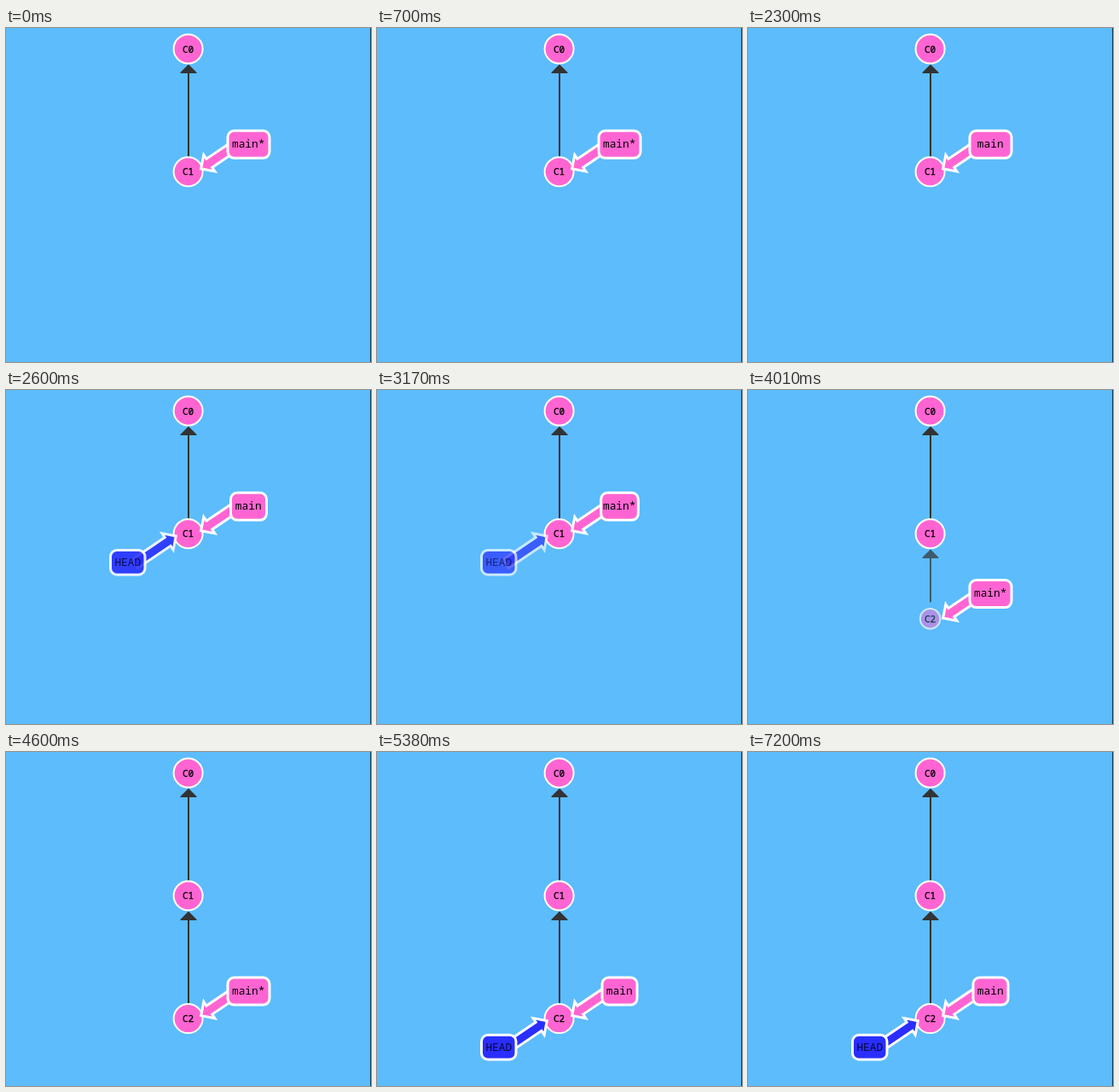
Write an HTML page that moves like this. It is 428 px wide and 391 px high and loops after 8000 ms.

```html
<!DOCTYPE html>
<html lang="en">
<head>
<meta charset="utf-8">
<title>Commit graph</title>
<style>
  /* detached: HEAD label shown; moved: labels at the new commit; born: growth of the new commit */
  @property --detached { syntax: "<number>"; inherits: true; initial-value: 0; }
  @property --moved { syntax: "<number>"; inherits: true; initial-value: 0; }
  @property --born { syntax: "<number>"; inherits: true; initial-value: 0; }

  html, body { margin: 0; width: 100%; height: 100%; overflow: hidden; background: #5cbcfc; }

  #stage {
    display: block; width: 100vw; height: 100vh;
    animation: detach 8s infinite, move 8s infinite, birth 8s infinite;
  }

  text { font: 12.83px "Noto Sans Mono", "DejaVu Sans Mono", monospace; text-anchor: middle; }
  .commit circle { fill: #ff65d2; stroke: #fff; stroke-width: 2; }
  .commit text { font-size: 11px; stroke: #000; stroke-width: .3; }
  .edge { fill: #333; }
  .ref rect, .ref use { fill: #ff65d2; stroke: #fff; stroke-width: 3; }

  #newEdge { opacity: var(--moved); }
  #newEdge .shaft { transform: translateY(calc((var(--moved) - 1) * 158px)); }

  #newCommit { transform: translateY(calc(var(--born) * 143.8px)); opacity: var(--born); }
  #newCommit circle { r: calc(var(--born) * 17px); fill-opacity: var(--born); }

  #refs { transform: translateY(calc(var(--moved) * 143.8px)); }
  #box {
    x: calc(260px + var(--detached) * 4px);
    width: calc(49px - var(--detached) * 8px);
  }
  #head > * { opacity: var(--detached); }
  #head rect, #head use { fill: #2a2eff; }
  #head text { fill: #08083c; }

  #starred { animation: starred 8s step-end infinite; }
  #plain { animation: plain 8s step-end infinite; }

  @keyframes detach {
    0%, 28.75% { --detached: 0; animation-timing-function: ease-in-out; }
    33.75%, 37.625% { --detached: 1; animation-timing-function: ease-in-out; }
    42.625%, 62% { --detached: 0; animation-timing-function: ease-in-out; }
    67%, 100% { --detached: 1; }
  }

  @keyframes move {
    0%, 47% { --moved: 0; animation-timing-function: ease-in-out; }
    52%, 100% { --moved: 1; }
  }

  /* bounce built from parabola halves */
  @keyframes birth {
    0%, 47.1125% { --born: 0; animation-timing-function: cubic-bezier(.333, 0, .667, .333); }
    50.749%, 54.385%, 56.203% { --born: 1; animation-timing-function: cubic-bezier(.333, .667, .667, 1); }
    52.567% { --born: .75; animation-timing-function: cubic-bezier(.333, 0, .667, .333); }
    55.294% { --born: .9375; animation-timing-function: cubic-bezier(.333, 0, .667, .333); }
    56.658% { --born: .9844; animation-timing-function: cubic-bezier(.333, 0, .667, .333); }
    57.1125%, 100% { --born: 1; }
  }

  @keyframes starred {
    0%, 38.2% { visibility: visible; }
    28.7%, 61.85%, 100% { visibility: hidden; }
  }
  @keyframes plain {
    0%, 38.2% { visibility: hidden; }
    28.7%, 61.85%, 100% { visibility: visible; }
  }
</style>
</head>
<body>
<svg id="stage" viewBox="0 0 428 391" preserveAspectRatio="none">
  <defs>
    <path id="pointer" d="M0 0L11.7-11.7V-6H58V6H11.7V11.7Z" transform="translate(15.1 -3.5) rotate(-34)"/>
    <path id="tip" d="M214 42.5L223.5 52V53H204.5V52Z"/>
  </defs>

  <rect width="428" height="391" fill="#5cbcfc"/>
  <rect x="427" width="1" height="391" fill="#173a55"/>

  <g class="edge">
    <rect x="213" y="50" width="2" height="101"/>
    <use href="#tip"/>
  </g>
  <g class="edge" id="newEdge">
    <svg x="213" y="187" width="2" height="110" overflow="hidden">
      <rect class="shaft" width="2" height="107"/>
    </svg>
    <use href="#tip" y="144"/>
  </g>

  <g class="commit" id="newCommit">
    <circle cx="213.6" cy="168.3"/>
    <text x="213.6" y="172.4">C2</text>
  </g>
  <g class="commit">
    <circle cx="213.6" cy="24.5" r="17"/>
    <text x="213.6" y="28.8">C0</text>
    <circle cx="213.6" cy="168.3" r="17"/>
    <text x="213.6" y="172.4">C1</text>
  </g>

  <g id="refs">
    <g class="ref" id="head">
      <use href="#pointer" transform="translate(214.4 167.5) rotate(180)"/>
      <rect x="122.5" y="187.5" width="40.5" height="28.7" rx="7.5"/>
      <text x="142.8" y="206.4">HEAD</text>
    </g>
    <g class="ref">
      <use href="#pointer" transform="translate(213.6 168.3)"/>
      <rect id="box" y="120.3" height="32" rx="7.5"/>
      <text id="starred" x="284.2" y="140">main*</text>
      <text id="plain" x="284.2" y="140">main</text>
    </g>
  </g>
</svg>
</body>
</html>
```
